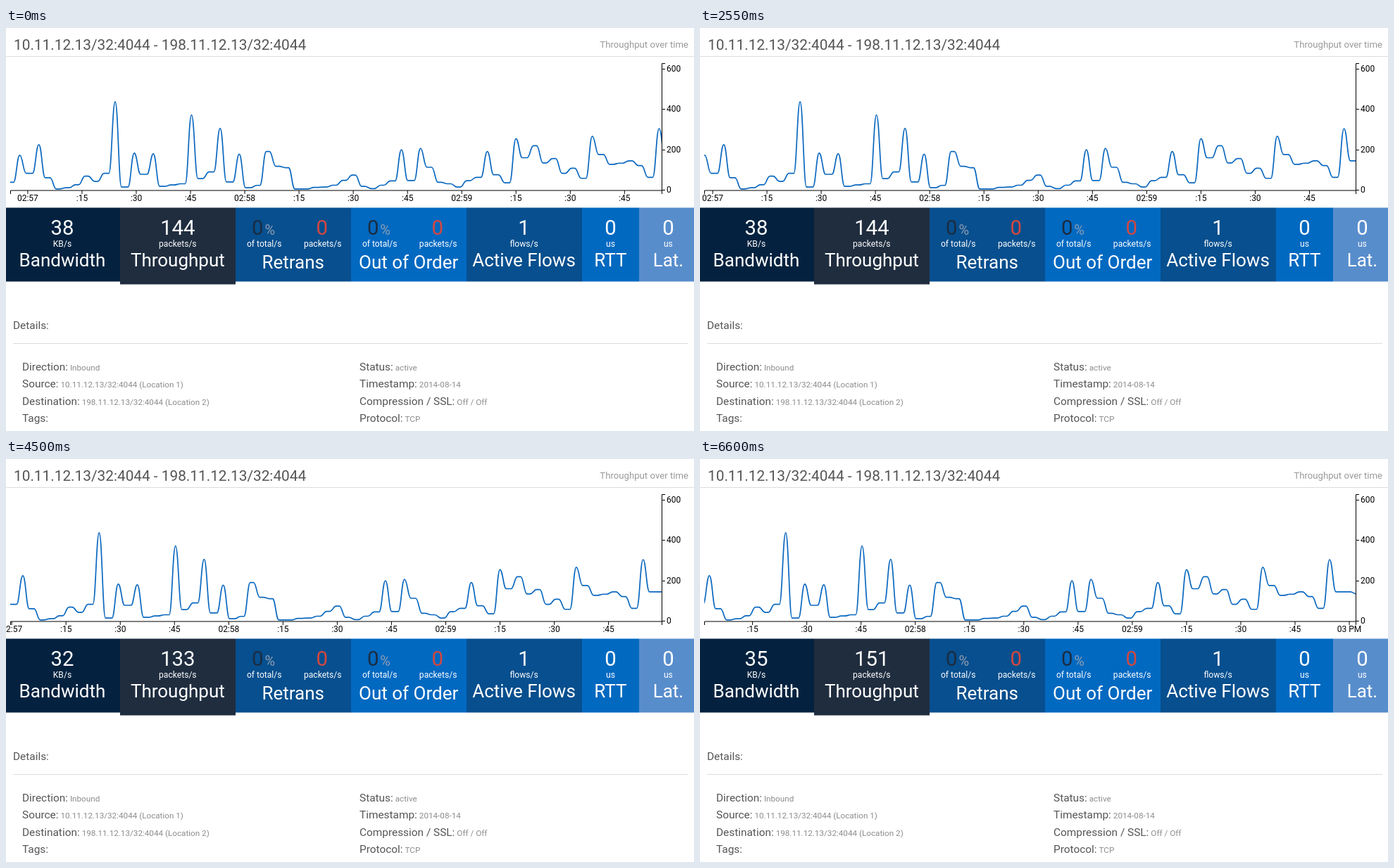
An HTML page for the animation above (6670 ms loop, 977x573 px).

```html
<!DOCTYPE html>
<html lang="en">
<head>
<meta charset="utf-8">
<title>Throughput over time</title>
<style>
  html, body { margin: 0; width: 100%; height: 100%; overflow: hidden; background: #fff; }
  svg { display: block; width: 977px; height: 573px; font-family: Roboto, "Open Sans", sans-serif; }
  .title { font-size: 20.8px; fill: #555; }
  .note { font-size: 13.2px; fill: #999; text-anchor: end; }
  .rule { stroke: #dcdcdc; }
  .axis { fill: none; stroke: #000; }
  .scale { font-size: 12px; fill: #000; }
  .curve { fill: none; stroke: #0b68bf; stroke-width: 1.7; stroke-linejoin: round; }
  .tile { fill: #fff; text-anchor: middle; }
  .num { font-size: 29.3px; }
  .unit { font-size: 12.1px; }
  .name { font-size: 26px; }
  .dark { fill: #1b2c41; }
  .pct { font-size: 20px; fill: #8d9db2; }
  .red { fill: #d5473f; }
  .key { font-size: 15.4px; fill: #555; }
  .val { font-size: 11.7px; fill: #8c8c8c; }
</style>
</head>
<body>
<svg viewBox="0 0 977 573">
  <defs><clipPath id="plot"><rect x="6" y="45" width="925.5" height="187"/></clipPath></defs>
  <text class="title" x="11" y="30.5">10.11.12.13/32:4044 - 198.11.12.13/32:4044</text>
  <text class="note" x="969" y="28">Throughput over time</text>
  <path class="rule" d="M0 40.5H977"/>
  <g clip-path="url(#plot)"><path id="curve" class="curve"/></g>
  <path class="axis" d="M6.5 236V231H931.5V236M936 50.5H931.5V231"/>
  <g id="yAxis"></g>
  <g id="xAxis"></g>
  <g id="tiles"></g>
  <text class="key" x="10" y="428">Details:</text>
  <path class="rule" d="M10 448.5H969"/>
  <g id="details"></g>
</svg>
<script>
const LOOP = 6670, STEP = 150;           // ms
const SECOND = 5.136, SCROLL = 5.05;     // px per second: axis scale, scroll speed
const UNIT = .2865, ZERO = 229.5;        // px per packet/s, y of zero
const SAMPLE = 13.55, RAMP = 9;          // px between samples, px per change of level
const $ = id => document.getElementById(id);

function add(parent, tag, attrs, text = '') {
  const el = document.createElementNS('http://www.w3.org/2000/svg', tag);
  for (const key in attrs) el.setAttribute(key, attrs[key]);
  el.textContent = text;
  return parent.appendChild(el);
}
const label = (parent, cls, x, y, text) => add(parent, 'text', { class: cls, x, y }, text);

// Packets per second, evenly sampled
const series = [
  35, 170, 80, 222, 58, 2, 8, 23, 66, 40, 80, 435, 12, 180, 75, 177, 15, 22,
  28, 370, 54, 87, 303, 37, 175, 8, 20, 188, 115, 108, 2, 2, 10, 12, 21, 45,
  71, 15, 4, 21, 42, 197, 44, 204, 110, 35, 28, 12, 43, 60, 188, 73, 33, 252,
  157, 217, 131, 153, 80, 105, 55, 264, 173, 124, 130, 142, 118, 60, 302, 142, 142, 131
];

// Tall maxima are pointed; every other level is held between ramps
const isPeak = i => series[i] - Math.max(series[i - 1], series[i + 1]) > 80;

function curvePath() {
  const y = series.map(v => ZERO - v * UNIT);
  let d = `M0 ${y[0]}`;
  for (let i = 1; i < y.length; i++) {
    const x0 = 6 + (i - 1) * SAMPLE, slack = SAMPLE - RAMP;
    const from = x0 + (isPeak(i - 1) ? 0 : isPeak(i) ? slack : slack / 2);
    d += `H${from}C${from + RAMP * .45} ${y[i - 1]} ${from + RAMP * .55} ${y[i]} ${from + RAMP} ${y[i]}`;
  }
  return d + 'H990';
}
$('curve').setAttribute('d', curvePath());

for (let v = 0; v <= 600; v += 200) {
  const y = Math.round(230 - v * UNIT);
  add($('yAxis'), 'path', { class: 'axis', d: `M931.5 ${y + .5}h4.5` });
  label($('yAxis'), 'scale', 938, y + 4, v);
}

const ticks = [];
for (let k = 0; k <= 12; k++) {
  const g = add($('xAxis'), 'g', {});
  const text = k === 12 ? '03 PM' : k % 4 ? ':' + 15 * (k % 4) : '02:' + (57 + k / 4);
  add(g, 'path', { class: 'axis', d: 'M0 231v5' });
  label(g, 'scale', 0, 246, text).setAttribute('text-anchor', 'middle');
  ticks.push({ g, x: 30.9 + k * 15 * SECOND });
}

// Tiles sit in a row of equal columns; slot and span count columns
const COLUMN = 163.9;
const edge = slot => Math.round(slot * COLUMN - 2);

function tile(slot, span, color, name, drop, extra = 0) {
  const g = add($('tiles'), 'g', { class: 'tile' });
  const x = edge(slot), mid = (slot + span / 2) * COLUMN - 2;
  add(g, 'rect', { x, y: 255.5, width: edge(slot + span) - x, height: 105 + extra, fill: color });
  label(g, 'name', mid, 339 + drop, name);
  return { g, mid };
}
function single(slot, span, color, num, unit, name, extra) {
  const { g, mid } = tile(slot, span, color, name, 0, extra);
  label(g, 'unit', mid, 311, unit);
  return label(g, 'num', mid, 293.5, num);
}
function double(slot, color, name) {
  const { g, mid } = tile(slot, 1, color, name, 3);
  label(g, 'num dark', mid - 50.5, 293.5, '0');
  label(g, 'pct', mid - 33, 293.5, '%');
  label(g, 'unit', mid - 41, 311, 'of total/s');
  label(g, 'num red', mid + 41, 293.5, '0');
  label(g, 'unit', mid + 42, 311, 'packets/s');
}
const navy = '#074f8e', blue = '#0269c1';
const band = single(0, 1, '#04223f', '38', 'KB/s', 'Bandwidth');
const rate = single(1, 1, '#1f2d3f', '144', 'packets/s', 'Throughput', 4);
double(2, navy, 'Retrans');
double(3, blue, 'Out of Order');
single(4, 1, navy, '1', 'flows/s', 'Active Flows');
single(5, .5, blue, '0', 'us', 'RTT');
single(5.5, .5, '#588dcc', '0', 'us', 'Lat.');

function details(x, rows) {
  rows.forEach(([key, val], i) => {
    const line = label($('details'), 'key', x, 487 + i * 24.4, key);
    add(line, 'tspan', { class: 'val', dx: 3 }, val);
  });
}
details(23, [
  ['Direction:', 'Inbound'],
  ['Source:', '10.11.12.13/32:4044 (Location 1)'],
  ['Destination:', '198.11.12.13/32:4044 (Location 2)'],
  ['Tags:', '']
]);
details(502, [
  ['Status:', 'active'],
  ['Timestamp:', '2014-08-14'],
  ['Compression / SSL:', 'Off / Off'],
  ['Protocol:', 'TCP']
]);

function draw(ms) {
  const t = Math.floor(ms % LOOP / STEP) * STEP;
  const shift = t / 1000 * SCROLL;
  $('curve').setAttribute('transform', `translate(${-shift})`);
  for (const { g, x } of ticks) {
    const at = x - shift;
    g.setAttribute('transform', `translate(${at})`);
    g.setAttribute('visibility', at >= 6 && at <= 931.5 ? 'visible' : 'hidden');
  }
  [band.textContent, rate.textContent] =
    t < 4050 ? [38, 144] : t < 6600 ? [32, 133] : [35, 151];
}

const start = performance.now();
function tick() {
  draw(performance.now() - start);
  requestAnimationFrame(tick);
}
tick();
</script>
</body>
</html>
```
